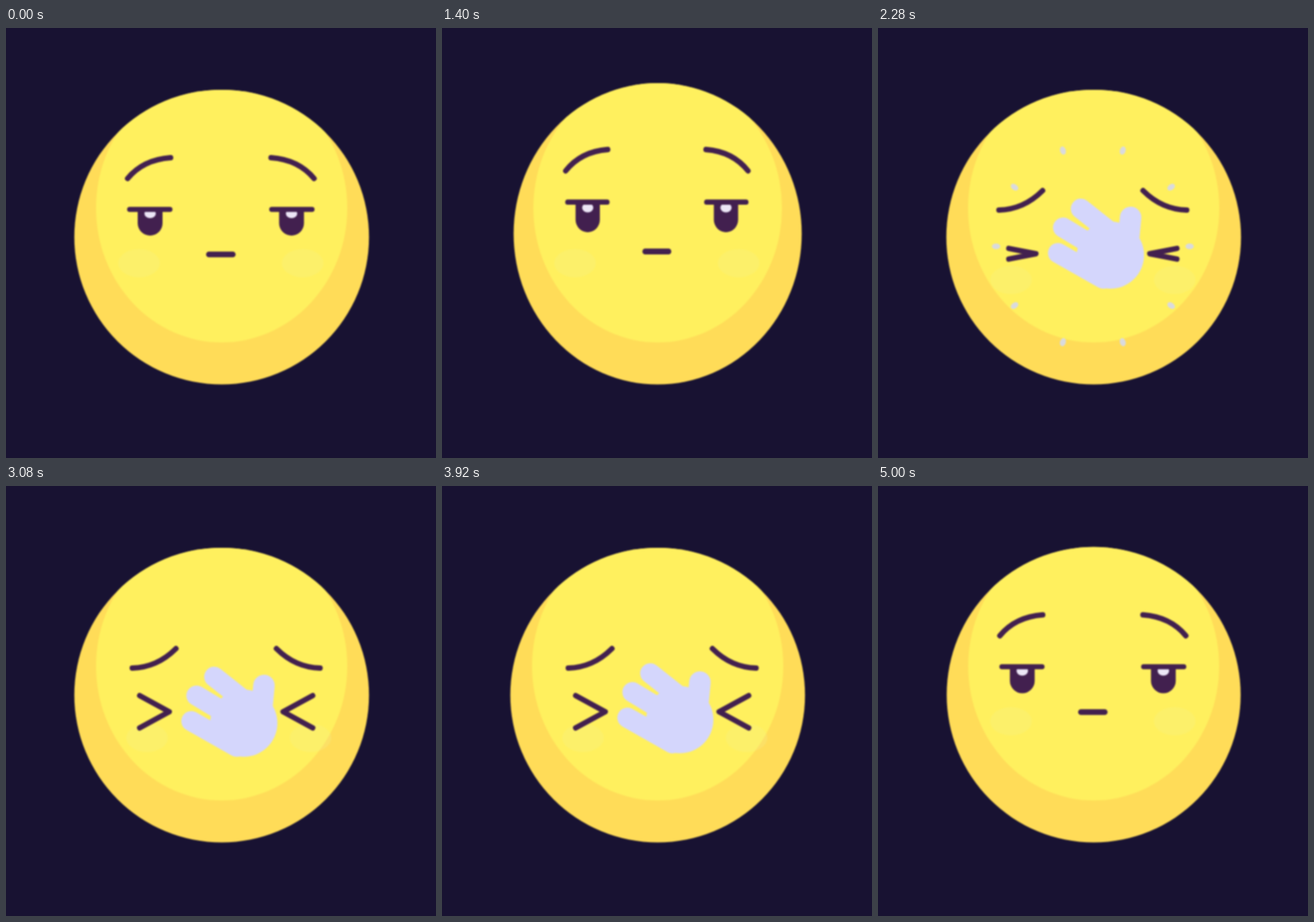
An HTML page with a canvas that plays this animation: 640 by 640 pixels, repeating every 5.04 s.

```html
<!DOCTYPE html>
<html lang="en">
<head>
<meta charset="utf-8">
<title>Sneezing face</title>
<style>
html, body { margin: 0; width: 100%; height: 100%; overflow: hidden; background: #181232; }
canvas { display: block; width: 100vmin; height: 100vmin; margin: auto; filter: blur(1px); }
</style>
</head>
<body>
<canvas id="stage" width="640" height="640"></canvas>
<script>
const ctx = document.getElementById('stage').getContext('2d');
const LOOP = 5040, STEP = 40, MID = 319.75;
const HEAD = { x: 321, base: 530.5, r: 219.3 };
const NIGHT = '#181232', INK = '#42204f', HAND = '#d4d6fc';

const mix = (a, b, u) => a + (b - a) * u;
const clamp = u => Math.min(1, Math.max(0, u));
const smooth = u => (1 - Math.cos(Math.PI * clamp(u))) / 2;
const wave = (t, start, period) => Math.sin(2 * Math.PI * (t - start) / period);

// Eased value from a list of [time, value] keys.
function track(keys, t) {
  let prev = keys[0];
  for (const key of keys) {
    if (t < key[0]) {
      return mix(prev[1], key[1], smooth((t - prev[0]) / (key[0] - prev[0])));
    }
    prev = key;
  }
  return prev[1];
}

const STRETCH = [[0, 0], [500, 0], [1060, 1], [1980, 0], [4400, 0],
  [4480, -0.14], [4800, 0.2], [5000, 0.08], [5040, 0]];
const CLOSE = [[0, 0], [1780, 0], [2180, 1], [4520, 1], [5020, 0]];
const SQUEEZE = [[0, 0], [2175, 0], [2445, 1], [4320, 1], [4520, 0]];
const REACH = [[0, 0], [1760, 0], [2160, 1], [4500, 1], [4900, 0]];
const RUB = [[0, 0], [2530, 0], [2720, 1], [4180, 1], [4400, 0]];

function poseAt(t) {
  const rub = track(RUB, t);
  const stretch = track(STRETCH, t);
  return {
    t,
    stretch,
    wide: 1 - 0.032 * stretch,
    tall: 1 + 0.032 * stretch,
    close: track(CLOSE, t),
    squeeze: track(SQUEEZE, t),
    reach: track(REACH, t),
    sway: 13 * rub * wave(t, 2616, 420),
    lift: 18 * rub * wave(t, 2533, 407)
  };
}

function ellipse(x, y, rx, ry, fill, turn = 0) {
  ctx.beginPath();
  ctx.ellipse(x, y, rx, ry, turn, 0, 2 * Math.PI);
  ctx.fillStyle = fill;
  ctx.fill();
}

function line(points, width, color = INK) {
  ctx.beginPath();
  points.forEach(([x, y], i) => i ? ctx.lineTo(x, y) : ctx.moveTo(x, y));
  ctx.lineWidth = width;
  ctx.strokeStyle = color;
  ctx.stroke();
}

function mirrored(draw) {
  for (const side of [1, -1]) {
    ctx.save();
    ctx.translate(MID, 0);
    ctx.scale(side, 1);
    ctx.translate(-MID, 0);
    draw();
    ctx.restore();
  }
}

function drawHead(p) {
  const ry = HEAD.r * p.tall;
  ctx.save();
  ellipse(HEAD.x, HEAD.base - ry, HEAD.r * p.wide, ry, '#ffdc58');
  ctx.clip();
  ellipse(HEAD.x, 268, 187 * (1 - 0.015 * p.stretch), 200, '#fff05e');
  ctx.restore();
}

function drawCheeks(p) {
  ctx.save();
  ctx.translate(1.5 * p.sway, mix(350, 375, p.close));
  mirrored(() => ellipse(198, 0, 31, 21, 'rgba(240, 234, 150, 0.22)'));
  ctx.restore();
}

function drawBrow(p) {
  const c = p.close, up = -6.5 * p.stretch;
  ctx.beginPath();
  ctx.moveTo(mix(181, 180, c), mix(224, 271, c) + up);
  ctx.quadraticCurveTo(mix(204, 217, c), mix(196, 270, c) + up, 245, mix(193, 242, c) + up);
  ctx.lineWidth = 8;
  ctx.strokeStyle = INK;
  ctx.stroke();
}

function drawEye(p) {
  const c = p.close;
  if (c > 0.995) {
    const x = mix(196.5, 191, p.squeeze), h = 24 * p.squeeze;
    line([[x, 336 - h], [235, 336], [x, 336 + h]], 8);
    return;
  }
  const lid = mix(270, 336, c) - 7 * p.stretch * (1 - c);
  const bottom = mix(309, 338, c);
  const height = Math.max(1, bottom - lid);
  const r = Math.min(18.5, height / 2);
  ctx.save();
  ctx.beginPath();
  ctx.roundRect(196, lid, 37, height, [0, 0, r, r]);
  ctx.fillStyle = INK;
  ctx.fill();
  ctx.clip();
  ellipse(214.5, lid + 6 + 3 * p.stretch, 8.5, 7 * (1 - c), '#ece6f6');
  ctx.restore();
  line([[mix(184, 196, c), lid], [mix(244, 236, c), lid]], 7.5);
}

function drawFeatures(p) {
  ctx.save();
  ctx.translate(HEAD.x, HEAD.base);
  ctx.scale(p.wide, p.tall);
  ctx.translate(p.sway - HEAD.x, -HEAD.base);
  mirrored(() => {
    drawBrow(p);
    drawEye(p);
  });
  line([[302, 337], [337.5, 337]], 8.5);
  ctx.restore();
}

function drawHand(p) {
  if (p.reach <= 0) return;
  const away = 1 - p.reach;
  ctx.save();
  ctx.globalAlpha = clamp(p.reach * 4);
  ctx.translate(181 * away + p.sway, 201 * away + p.lift);
  line([[302, 269], [360, 315]], 30, HAND);
  line([[275.5, 297], [335, 333]], 30, HAND);
  line([[268, 335], [335, 373]], 30, HAND);
  line([[376, 282], [371, 335]], 32, HAND);
  ellipse(346, 338, 50, 50, HAND);
  ctx.restore();
}

function drawSpray(p) {
  const u = (p.t - 2140) / 360;
  if (u <= 0 || u >= 1) return;
  const radius = 53 + 150 * u * (2 - u);
  const size = Math.sqrt(1 - u);
  for (let i = 0; i < 10; i++) {
    const a = i * Math.PI / 5;
    ellipse(MID + 0.98 * radius * Math.cos(a), 325 + 1.02 * radius * Math.sin(a),
      8 * size, 5.5 * size, '#d9dade', a);
  }
}

function draw(t) {
  const p = poseAt(t);
  ctx.fillStyle = NIGHT;
  ctx.fillRect(0, 0, 640, 640);
  ctx.lineCap = ctx.lineJoin = 'round';
  drawHead(p);
  drawCheeks(p);
  drawFeatures(p);
  drawSpray(p);
  drawHand(p);
}

const start = performance.now();
function tick() {
  const t = (performance.now() - start) % LOOP;
  draw(Math.floor(t / STEP) * STEP);
  requestAnimationFrame(tick);
}
tick();
</script>
</body>
</html>
```
